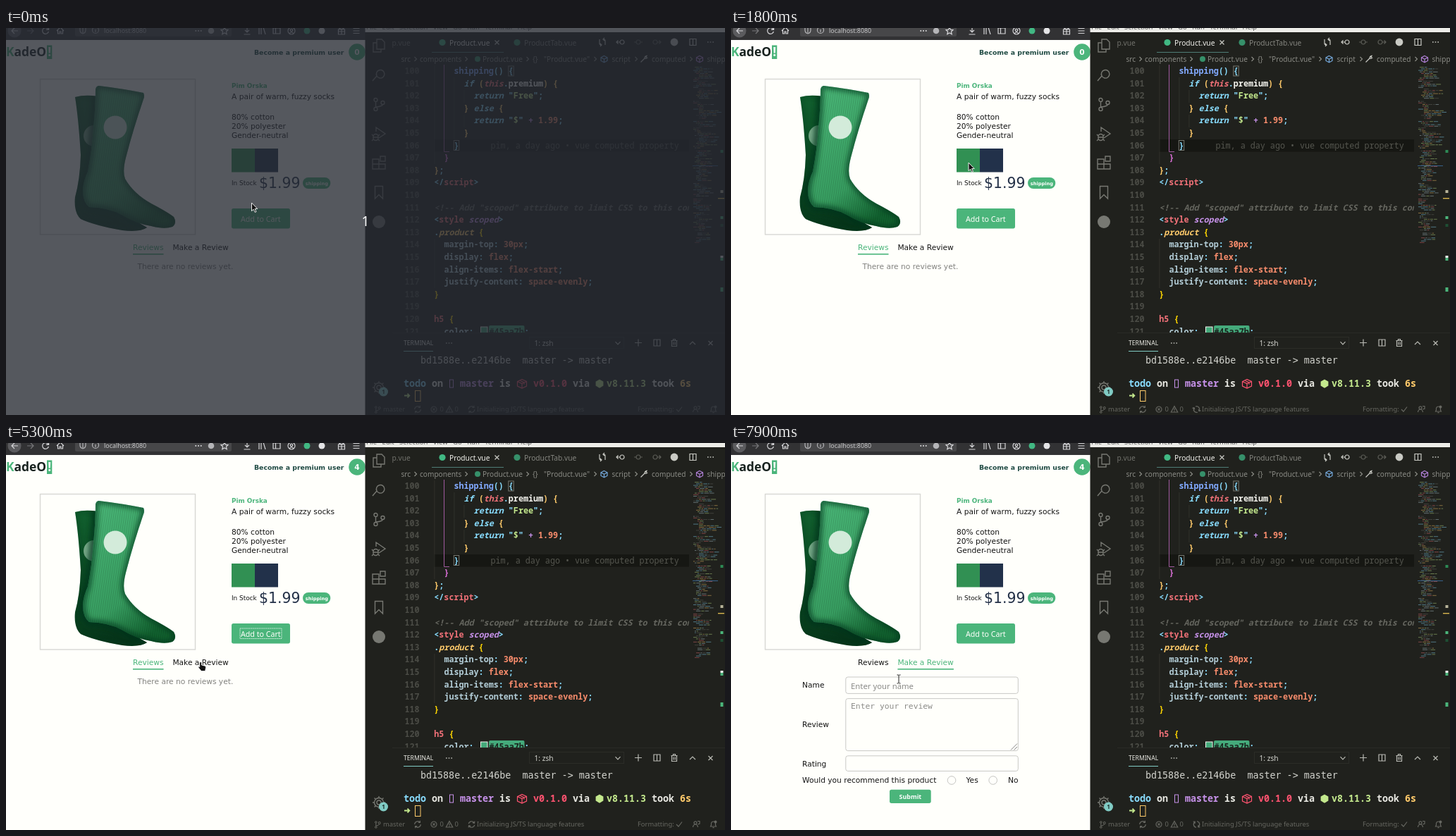
Write an HTML page that moves like this. It is 1020 by 549 pixels and loops after 8 s.

```html
<!DOCTYPE html>
<html lang="en">
<head>
<meta charset="utf-8">
<title>Shop demo</title>
<style>
html, body { margin: 0; width: 100%; height: 100%; overflow: hidden; background: #fffffb; }
svg { display: block; width: 100vw; height: 100vh; --light: #4ab778; --mid: #379d60; --deep: #11612f; --ink: #06351a; }
text { white-space: pre; font-family: "DejaVu Sans", sans-serif; }
.n { font-family: "Noto Sans", sans-serif; }
.m { font-family: "Noto Sans Mono", monospace; }
.d { font-family: "DejaVu Sans Mono", monospace; }
.b { font-weight: bold; }
.i { font-style: italic; }
.icon { fill: none; stroke-width: 1.2; }
</style>
</head>
<body>
<svg id="stage" viewBox="0 0 1020 549" xml:space="preserve"></svg>
<script>
const GREEN = '#4bb57b', DARK = '#20211d', CYAN = '#89ddff', PURPLE = '#c792ea';
const RED = '#f07178', ORANGE = '#f78c6c', LIME = '#c3e88d', GOLD = '#ffcb6b', PALE = '#b2ccd6';
const LOOP = 8000, ADV = 7.04;

const esc = s => String(s).replace(/&/g, '&amp;').replace(/</g, '&lt;');
const text = (x, y, s, fill, size, cls = '', more = '') =>
  `<text x="${x}" y="${y}" fill="${fill}" font-size="${size}" class="${cls}" ${more}>${esc(s)}</text>`;
const rect = (x, y, w, h, fill, more = '') =>
  `<rect x="${x}" y="${y}" width="${w}" height="${h}" fill="${fill}" ${more}/>`;
const dot = (x, y, r, fill, more = '') => `<circle cx="${x}" cy="${y}" r="${r}" fill="${fill}" ${more}/>`;
const icon = (x, y, d, color, more = '') =>
  `<path class="icon" transform="translate(${x} ${y})" d="${d}" stroke="${color}" ${more}/>`;
const frame = (x, y, w, h, color, r = 0) => rect(x, y, w, h, 'none', `stroke="${color}" rx="${r}"`);

const DOTS = 'M-4.5 0h1.6M-.8 0h1.6M2.9 0h1.6';
const CROSS = 'M-3 -3L3 3M3 -3L-3 3';
const SYNC = 'M-4.3 0A4.3 4.3 0 0 1 3 -3M3.4 -5.2V-2.6H.8M4.3 0A4.3 4.3 0 0 1 -3 3M-3.4 5.2V2.6H-.8';
const CUBE = 'M0 -4.5L4.5 -2.2V2.5L0 4.8L-4.5 2.5V-2.2ZM-4.5 -2.2L0 .2L4.5 -2.2M0 .2V4.8';
const SPLIT = 'M-4.5 -4.5H4.5V4.5H-4.5ZM0 -4.5V4.5';

function browserBar() {
  const c = '#d5d5d8';
  return rect(0, 0, 510, 17, '#323234') + rect(98, -4, 222, 16, '#474749', 'rx="2"') +
    dot(12, 4, 9.5, '#5b5b5e') +
    icon(12, 4, 'M5 0H-4M0 -4L-4 0L0 4', c) +
    icon(35, 4, 'M-5 0H4M0 -4L4 0L0 4', '#77777a') +
    icon(56, 4, 'M4 -2A4.4 4.4 0 1 0 4.4 1M4.6 -5V-1.6H1', c) +
    icon(77, 3, 'M-5 1L0 -4L5 1M-3.5 0V5H-1V2H1V5H3.5V0', c) +
    icon(109, 3, 'M-4 -4H4V0Q4 4 0 5Q-4 4 -4 0ZM0 -4V4', '#b5b5b8') +
    icon(127, 3, 'M-4.5 0A4.5 4.5 0 1 0 4.5 0A4.5 4.5 0 1 0 -4.5 0M0 -1V3', '#b5b5b8') +
    text(139, 7, 'localhost:8080', '#c9c9cb', 8.9, 'n') +
    icon(273, 4, DOTS, c, 'style="stroke-width:1.8"') + dot(291, 4, 4.3, '#b5b5b8') +
    icon(310, 4, 'M0 -5L1.5 -1.6L5 -1.2L2.4 1.2L3.2 4.8L0 3L-3.2 4.8L-2.4 1.2L-5 -1.2L-1.5 -1.6Z', c) +
    icon(342, 4, 'M0 -5V2M-3 -1L0 2L3 -1M-4.5 5H4.5', c) +
    icon(363, 4, 'M-4 -5V5M-1 -5V5M2 -5L5 5', c) +
    icon(384, 4, 'M-5 -4H5V4H-5ZM-1.5 -4V4', c) +
    icon(405, 4, 'M-5 0A5 5 0 1 0 5 0A5 5 0 1 0 -5 0M-1.7 -1A1.7 1.7 0 1 0 1.7 -1A1.7 1.7 0 1 0 -1.7 -1M-3 4Q0 0 3 4', c) +
    dot(427, 4, 4.5, '#41b883') + dot(448, 4, 4.5, '#e4e4e6') +
    icon(476, 4, 'M-4.5 -2H4.5V5H-4.5ZM0 -2V5M-4.5 1H4.5M0 -2Q-4 -5 -3 -2M0 -2Q4 -5 3 -2', c) +
    icon(497, 4, 'M-4.5 -3.5H4.5M-4.5 0H4.5M-4.5 3.5H4.5', c);
}

function socks() {
  const back = 'M98 98Q112 94 130 97L150 230Q170 268 200 283Q190 290 165 287Q125 280 106 271Q96 262 98 240Q105 215 106 180Q103 130 98 98Z';
  const front = 'M132 82Q165 86 195 92Q197 96 195 101Q180 145 170 184Q165 203 169 214Q181 235 206 249Q229 261 238 268Q243 277 236 282Q225 286 206 281Q186 278 164 265Q146 255 118 254Q109 247 109 230Q110 216 116 204Q122 172 124 142Q127 112 127 87Q128 82 132 82Z';
  const edge = (d, width, opacity) =>
    `<path d="${d}" fill="none" stroke="var(--ink)" stroke-width="${width}" opacity="${opacity}" filter="url(#soft)"/>`;
  return `<defs>
    <linearGradient id="front" x1=".1" y1="0" x2=".6" y2="1"><stop offset="0" stop-color="var(--light)"/>
      <stop offset=".7" stop-color="var(--mid)"/><stop offset="1" stop-color="var(--deep)"/></linearGradient>
    <linearGradient id="back" x1="0" y1="0" x2=".3" y2="1"><stop offset="0" stop-color="var(--deep)"/>
      <stop offset="1" stop-color="var(--ink)"/></linearGradient>
    <pattern id="rib" width="3" height="6" patternUnits="userSpaceOnUse" patternTransform="rotate(8)">
      <path d="M.5 0V6" stroke="#000" stroke-opacity=".12"/></pattern>
    <filter id="soft" x="-20%" y="-20%" width="140%" height="140%"><feGaussianBlur stdDeviation="3"/></filter>
    <clipPath id="backClip"><path d="${back}"/></clipPath>
    <clipPath id="frontClip"><path d="${front}"/></clipPath></defs>
    <path d="${back}" fill="url(#back)"/>
    <g clip-path="url(#backClip)">${dot(125, 153, 15, '#9cc9ad', 'opacity=".75"')}${edge(front, 12, .7)}${edge(back, 4, .5)}</g>
    <path d="${front}" fill="url(#front)"/><path d="${front}" fill="url(#rib)"/>
    <g clip-path="url(#frontClip)">${edge(front, 9, .6)}</g>
    ${dot(155, 141, 16.5, '#d3ebda')}`;
}

function shop() {
  const body = (x, y, s, fill = '#141414') => text(x, y, s, fill, 10.667);
  return rect(0, 0, 510, 549, '#fffffb') + browserBar() +
    `<text x="0" y="40" font-size="17.4" class="n b" fill="#18221f"><tspan fill="${GREEN}">K</tspan>adeO</text>` +
    rect(58, 24.5, 7.3, 19.5, GREEN) + text(59.2, 40, '!', '#fff', 17.4, 'n b') +
    text(352, 37.5, 'Become a premium user', '#1f4a43', 9.333, 'b') +
    dot(498, 34, 11.8, GREEN) + text(498, 38, 0, '#fff', 10.667, 'b', 'id="count" text-anchor="middle"') +
    rect(48.5, 72.5, 220, 220.5, '#fffffb', 'stroke="#d8d8d4" stroke-width="1.4"') + socks() +
    text(320, 84.5, 'Pim Orska', GREEN, 8.85, 'b') +
    body(320, 100.8, 'A pair of warm, fuzzy socks') + body(320, 130.3, '80% cotton') +
    body(320, 142.9, '20% polyester') + body(320, 155.5, 'Gender-neutral') +
    rect(320, 171, 33, 33.5, '#319053') + rect(353, 171, 33, 33.5, '#22314a') +
    `<g id="inStock">${text(320, 223, 'In Stock', '#141414', 8.89)}${text(359, 227.3, '$1.99', '#243148', 20.4)}
      ${rect(421, 212, 39.3, 16, GREEN, 'rx="8"')}${text(424.7, 222.5, 'shipping', '#fff', 6.67, 'b')}</g>` +
    `<g id="outStock">${text(320, 216.5, 'Out of Stock', '#141414', 8.89)}</g>` +
    `<g id="buy">${rect(320, 256, 83, 28.5, GREEN, 'rx="2.7" id="buyBox"')}
      ${text(333, 274.5, 'Add to Cart', '#fffffb', 10.667, 'n')}
      <g id="focus">${rect(332, 263, 59, 14.5, 'none', 'stroke="#fff" stroke-width=".8" stroke-dasharray="1 .6"')}</g></g>` +
    text(180, 314.6, 'Reviews', GREEN, 10.667, '', 'id="tabList"') +
    rect(180, 320, 43.5, 1.6, GREEN, 'id="lineList"') +
    text(236.4, 314.6, 'Make a Review', '#141414', 10.667, '', 'id="tabMake"') +
    rect(236.4, 320, 79.5, 1.6, GREEN, 'id="lineMake"') +
    `<g id="empty">${body(186.5, 342, 'There are no reviews yet.', '#82827f')}</g>` +
    `<g id="form">${body(101, 347.3, 'Name')}${frame(162.8, 332, 244.5, 23.4, '#c9c9c6', 3)}
      ${text(170, 348.6, 'Enter your name', '#8b8b88', 11.33, 'n')}
      ${body(101, 403, 'Review')}${frame(162.8, 362.6, 244.5, 74, '#c9c9c6', 3)}
      ${text(170, 377.3, 'Enter your review', '#8b8b88', 11.33, 'd')}
      ${icon(406, 435.5, 'M-9 0L0 -9M-4.5 0L0 -4.5', '#777', 'style="stroke-width:.9"')}
      ${body(101, 458.5, 'Rating')}${frame(162.8, 443.8, 244.5, 21.6, '#c9c9c6', 3)}
      ${body(101, 482.3, 'Would you recommend this product')}
      ${dot(313, 478.5, 5.8, '#fffffb', 'stroke="#c4c4c1"')}${body(333.5, 482.3, 'Yes')}
      ${dot(371.7, 478.5, 5.8, '#fffffb', 'stroke="#c4c4c1"')}${body(393, 482.3, 'No')}
      ${rect(225, 491.7, 58.7, 19.3, GREEN, 'rx="2.7"')}${text(238.6, 504.7, 'Submit', '#fff', 8.89, 'n b')}</g>`;
}

// Each row: indent, then colour and text pairs; a leading ~ marks italics.
const rows = [
  [4, '#82aaff', 'shipping', CYAN, '() {'],
  [6, CYAN, '~if', GOLD, ' (', RED, '~this', CYAN, '.', '#f4f4ee', 'premium', GOLD, ') {'],
  [8, CYAN, '~return', CYAN, ' "', LIME, 'Free', CYAN, '";'],
  [6, GOLD, '}', CYAN, '~ else', GOLD, ' {'],
  [8, CYAN, '~return', CYAN, ' "', LIME, '$', CYAN, '" ', PURPLE, '+', ORANGE, ' 1.99', CYAN, ';'],
  [6, GOLD, '}'], [4, CYAN, '}'], [2, '#da70d6', '}'], [0, GOLD, '}', CYAN, ';'],
  [0, CYAN, '</', RED, 'script', CYAN, '>'], [0],
  [0, '#65665f', '~<!-- Add "scoped" attribute to limit CSS to this component -->'],
  [0, CYAN, '<', RED, 'style', PURPLE, '~ scoped', CYAN, '>'],
  [0, CYAN, '.', GOLD, '~product', '#ffd700', ' {'],
  ...[['margin-top', '30px'], ['display', 'flex'], ['align-items', 'flex-start'], ['justify-content', 'space-evenly']]
    .map(([k, v]) => [2, PALE, k, CYAN, ': ', ORANGE, v, CYAN, ';']),
  [0, '#ffd700', '}'], [0], [0, RED, 'h5', '#ffd700', ' {'], [2, PALE, 'color', CYAN, ':']
];

function code() {
  let out = rect(607, 158, 362, 17.6, '#161713');
  for (const [x, y, h] of [[607.5, 53, 140], [635.5, 70, 88], [649.5, 88, 18], [649.5, 123, 18], [607.5, 299, 70]])
    out += rect(x, y, .8, h, '#34352f');
  out += `<path d="M621.5 52V175.5H629" class="icon" stroke="#a05a9f" style="stroke-width:1"/>` +
    frame(712.8, 54, 7.4, 14, '#777870') + frame(635.3, 159.5, 7.4, 14, '#777870');
  rows.forEach(([indent, ...parts], i) => {
    const y = 65 + 17.6 * i;
    out += text(565.5, y, 100 + i, '#4b4c46', 11.73, 'm b');
    let spans = '';
    for (let k = 0; k < parts.length; k += 2) {
      const slant = parts[k + 1][0] === '~';
      spans += `<tspan fill="${parts[k]}" class="${slant ? 'i' : ''}">${esc(parts[k + 1].slice(+slant))}</tspan>`;
    }
    out += `<text x="${607.3 + indent * ADV}" y="${y}" font-size="11.73" class="m b">${spans}</text>`;
  });
  const end = 65 + 17.6 * 21;
  out += text(687.5, 170.6, 'pim, a day ago • vue computed property', '#55564f', 11.73, 'm') +
    rect(673.5, 424, 9.5, 10, '#45aa7b', 'stroke="#f4f4ee"') + rect(685, 422, 50.5, 14, '#45aa7b', 'rx="2"') +
    text(685.5, end, '#45aa7b', '#18231d', 11.73, 'm b') + text(735, end, ';', CYAN, 11.73, 'm b');
  return `<clipPath id="codeClip"><rect x="555" y="52" width="414" height="380"/></clipPath><g clip-path="url(#codeClip)">${out}</g>`;
}

function minimap() {
  let seed = 7, out = '';
  const rnd = () => (seed = seed * 16807 % 2147483647) / 2147483647;
  const tints = [PALE, RED, GOLD, LIME, CYAN, '#65665f'];
  for (let y = 53; y < 304; y += 2.2) {
    if (rnd() < .12) continue;
    let x = 975 + Math.floor(rnd() * 5) * 2;
    const stop = x + 5 + rnd() * (y < 190 ? 24 : 15);
    while (x < stop) {
      const w = 1.5 + rnd() * 6;
      out += rect(x.toFixed(1), y.toFixed(1), w.toFixed(1), 1, tints[Math.floor(rnd() * 6)], 'opacity=".45"');
      x += w + 1;
    }
  }
  out += rect(974, 195, 36, 1, '#37618a') + rect(1010, 241, 9, 1.4, '#d9b64f');
  for (const [y, h, c] of [[173, 4, '#2c8a55'], [230, 4, '#b8b49a'], [267, 4, GREEN], [278, 4, '#1e4f34'], [323, 3, '#eee'], [326, 4, GREEN], [368, 6, GREEN]])
    out += rect(1013.5, y, 4, h, c);
  return out;
}

function sidebar() {
  const c = '#777872';
  const big = (y, d) => icon(529, y, d, c, 'style="stroke-width:1.4"');
  return big(25, 'M-3 -9H4L8 -5V5H-3ZM-3 -4H-8V9H3V5') +
    big(66, 'M-3 2A5.8 5.8 0 1 1 1 5A5.8 5.8 0 0 1 -3 2L-9 9') +
    big(108, 'M-7 -6A2.5 2.5 0 1 0 -2 -6A2.5 2.5 0 1 0 -7 -6M-7 7A2.5 2.5 0 1 0 -2 7A2.5 2.5 0 1 0 -7 7M3 -2A2.5 2.5 0 1 0 8 -2A2.5 2.5 0 1 0 3 -2M-4.5 -3.5V4.5M5.5 .5Q5 3 -4 4') +
    big(150, 'M-4 -3V-9L9 0L0 6M-8 4A3.5 3.5 0 0 1 -1 4V6A3.5 3.5 0 0 1 -8 6ZM-10 1L-8 3M1 1L-1 3M-10 10L-8 8M1 10L-1 8M-8 5H-1') +
    big(191, 'M-9 -5H0V9H-9ZM-9 2H9V9H0M2 -9H9V-2H2Z') +
    big(233, 'M-5.5 -8.5H5.5V9L0 3.5L-5.5 9Z') + dot(529, 275, 9, c) +
    big(510, 'M-3 0A3 3 0 1 0 3 0A3 3 0 1 0 -3 0M-6.5 0A6.5 6.5 0 1 0 6.5 0A6.5 6.5 0 1 0 -6.5 0M0 -9V-6.5M0 9V6.5M-9 0H-6.5M9 0H6.5M-6.4 -6.4L-4.6 -4.6M6.4 -6.4L4.6 -4.6M-6.4 6.4L-4.6 4.6') +
    dot(535.5, 516, 6.5, '#80cbc4') + text(533.2, 519.2, 1, '#1b2b28', 8, 'n b');
}

function header() {
  const c = '#c9cac4', grey = '#8a8b85', low = '#5c5d57';
  const crumb = (x, s) => text(x, 47.6, s, grey, 10.1, 'n');
  return rect(509.5, 0, 510.5, 6, '#ecece8') +
    text(511, 1.5, 'File   Edit   Selection   View   Go   Run   Terminal   Help', '#555', 9.5, 'n') +
    text(547.5, 24.5, 'p.vue', '#70716b', 10.2, 'n') + dot(619, 20.5, 4.6, '#41b883') +
    text(629, 24.5, 'Product.vue', '#f1f1ec', 10.2, 'n') + icon(696.5, 20.5, CROSS, c) +
    rect(604, 34, 102, 1, '#4f7d76') +
    dot(725, 20.5, 4.6, '#36906a') + text(735, 24.5, 'ProductTab.vue', '#84857f', 10.2, 'n') +
    icon(846, 20, 'M-4 -4V2Q-4 4 -1 4M-3 2L-1 4L-3 6M4 4V-2Q4 -4 1 -4M3 -6L1 -4L3 -2', c) +
    icon(872, 20, 'M-1 0A3 3 0 1 0 5 0A3 3 0 1 0 -1 0M-1 0H-6M-3.5 -2.5L-6 0L-3.5 2.5', c) +
    icon(897, 20, 'M-3 0A3 3 0 1 0 3 0A3 3 0 1 0 -3 0M-6 0H-3M3 0H6', low) +
    icon(923, 20, 'M-5 0A3 3 0 1 0 1 0A3 3 0 1 0 -5 0M1 0H6M3.5 -2.5L6 0L3.5 2.5', low) +
    dot(948, 20, 5.4, c) + icon(974.5, 20, SPLIT, c) + icon(999.5, 20, DOTS, c, 'style="stroke-width:1.6"') +
    crumb(560.5, 'src') + crumb(587, 'components') + dot(669, 44, 4, '#36906a') + crumb(676, 'Product.vue') +
    crumb(747, '{}') + crumb(763, '"Product.vue"') + icon(848.5, 44, CUBE, '#75a9dc') + crumb(859.5, 'script') +
    icon(905, 44, 'M-4.5 4.5L1 -1M1 -1A3.2 3.2 0 0 1 4 -4.6L2.8 -2.6L4.6 -1.6A3.2 3.2 0 0 1 1 -1', c) +
    crumb(916, 'computed') + icon(984, 44, CUBE, '#b180d7') + crumb(994.5, 'shipping') +
    [581, 653, 740, 836, 894, 972].map(x => icon(x, 44, 'M-1.5 -3L1.5 0L-1.5 3', grey)).join('');
}

function terminal() {
  const c = '#b9bab4', low = '#666761';
  const bold = (x, s, fill) => text(x, 508.6, s, fill, 13.33, 'm b');
  const status = (x, s) => text(x, 544.3, s, low, 9.4, 'n');
  return rect(548, 432, 472, 102, DARK) + rect(548, 432, 472, .8, '#2d2e29') +
    text(564, 450, 'TERMINAL', '#e8e8e2', 8.6, 'n') + rect(564, 458, 42, 1, '#80cbc4') +
    icon(628.5, 447, DOTS, c, 'style="stroke-width:1.6"') + frame(742.5, 438.5, 134, 16, '#2b2c27') +
    text(749.5, 450.7, '1: zsh', '#d4d5cf', 10.2, 'n') + icon(868, 447, 'M-3.5 -1.8L0 1.8L3.5 -1.8', c) +
    icon(897, 446.5, 'M-5 0H5M0 -5V5', c) + icon(923.5, 446.5, SPLIT, c) +
    icon(948, 446.5, 'M-4.5 -3H4.5M-3.5 -3V5H3.5V-3M-1.5 -3V-5H1.5V-3M-1.2 -1V3M1.2 -1V3', c) +
    icon(974, 447, 'M-4 2L0 -2L4 2', c) + icon(999.5, 447, CROSS, c) +
    text(588, 475.5, 'bd1588e..e2146be  master -> master', '#d2d3cd', 13.33, 'd') +
    bold(564, 'todo', CYAN) + bold(604, 'on', '#e8e8e2') + frame(629.5, 499, 5, 11, PURPLE) +
    bold(644, 'master', PURPLE) + bold(700, 'is', '#e8e8e2') +
    icon(732, 504.5, 'M-6.5 -3L0 -6L6.5 -3V3.5L0 6.5L-6.5 3.5ZM-6.5 -3L0 0L6.5 -3M0 0V6.5M-3.5 -4.5L3 -1.5V1', '#ff5370') +
    bold(748, 'v0.1.0', '#ff5370') + bold(804, 'via', '#e8e8e2') +
    `<path d="M842 498.5L847.4 501.6V507.6L842 510.7L836.6 507.6V501.6Z" fill="${LIME}"/>` +
    bold(852, 'v8.11.3', LIME) + bold(916, 'took', '#e8e8e2') + bold(956, '6s', GOLD) +
    icon(569, 521.5, 'M-4 0H3M.5 -2.8L3.3 0L.5 2.8', LIME, 'style="stroke-width:1.8"') +
    frame(580.5, 514.5, 7.5, 15, GOLD) +
    icon(527, 541, 'M-3.5 -3A1.3 1.3 0 1 0 -.9 -3A1.3 1.3 0 1 0 -3.5 -3M-3.5 4A1.3 1.3 0 1 0 -.9 4A1.3 1.3 0 1 0 -3.5 4M1.5 -2A1.3 1.3 0 1 0 4 -2A1.3 1.3 0 1 0 1.5 -2M-2.2 -1.7V2.7M2.8 -.7Q2 2 -2 2', low, 'style="stroke-width:1"') +
    status(535, 'master') + icon(584, 541, SYNC, low) +
    icon(607, 541, 'M-4 0A4 4 0 1 0 4 0A4 4 0 1 0 -4 0M-1.6 -1.6L1.6 1.6M1.6 -1.6L-1.6 1.6', low) + status(615.5, '0') +
    icon(629, 541, 'M0 -4.5L4.7 4H-4.7ZM0 -1.5V1.5M0 2.2V3.2', low) + status(636.5, '0') +
    `<g id="spin">${icon(0, 0, SYNC, low)}</g>` + status(668, 'Initializing JS/TS language features') +
    status(896, 'Formatting:') + icon(955, 541, 'M-4 0L-1 3L4 -3.5', low) +
    icon(979, 541, 'M-4.5 4Q-4 0 -1 0Q2 0 2.5 4M-3 -2.2A2 2 0 1 0 1 -2.2A2 2 0 1 0 -3 -2.2M2 -4.5H5V-1L2.5 0', low) +
    icon(1003.5, 541, 'M-4 3H4L3 1V-1.5Q2.5 -4 0 -4Q-2.5 -4 -3 -1.5V1ZM-1 4.6H1', low) + dot(1006.5, 537.5, 2, low);
}

const pointers = `
  <path id="arrow" d="M0 0V11.6L2.7 9.2L4.7 13.4L6.5 12.6L4.6 8.5H8.2Z" fill="#111" stroke="#fff" stroke-width=".9"/>
  <path id="hand" transform="translate(-3 0)" d="M3 .4Q4.6 .4 4.6 2.2V5L9.4 6.2Q10.8 6.7 10.5 8.8L9.6 13.5H4L.2 8.8Q-.6 7.6 .4 7.1Q1.2 6.9 1.7 7.6V2.2Q1.7 .4 3 .4Z" fill="#111" stroke="#fff" stroke-width=".8"/>
  <path id="beam" d="M-2.5 -6H-.7L0 -5.3L.7 -6H2.5M0 -5.3V5.3M-2.5 6H-.7L0 5.3L.7 6H2.5" fill="none" stroke="#222" stroke-width="1"/>`;

const stage = document.getElementById('stage');
stage.innerHTML = shop() + rect(509.5, 0, 510.5, 549, DARK) + header() + sidebar() + code() + minimap() + terminal() +
  `<g id="veil">${rect(0, 0, 1020, 549, '#262a33', 'opacity=".78"')}
    ${text(510, 281, 1, '#fff', 19, 'n', 'text-anchor="middle"')}</g><g id="pointer">${pointers}</g>`;

const el = {};
for (const node of stage.querySelectorAll('[id]')) el[node.id] = node;
const show = (node, on) => node.setAttribute('display', on ? 'inline' : 'none');
const set = (node, name, value) => node.setAttribute(name, value);

// time, x, y
const path = [
  [0, 348.5, 248], [700, 348, 248], [1100, 354, 212], [1300, 356, 187], [1500, 361, 186], [1800, 337, 191],
  [1900, 336, 191.5], [2900, 336, 191.5], [3400, 345, 273], [3600, 343.5, 276], [4600, 343.5, 276],
  [5200, 280, 311], [5500, 268, 308], [5900, 268, 309], [6100, 240, 344], [6600, 176, 385],
  [7000, 174, 374], [7400, 174, 352], [7900, 238, 335], [8000, 238, 335]
];
function pointerAt(t) {
  const i = path.findIndex(p => p[0] > t);
  const [t0, x0, y0] = path[i - 1], [t1, x1, y1] = path[i];
  const k = (t - t0) / (t1 - t0);
  return [x0 + (x1 - x0) * k, y0 + (y1 - y0) * k];
}
const within = (x, y, l, t, r, b) => x >= l && x <= r && y >= t && y <= b;

function draw(ms) {
  let t = Math.floor(ms % LOOP / 100) * 100;
  if (t < 200) t = 0;
  show(el.veil, t < 200);

  const [x, y] = pointerAt(t);
  const hand = within(x, y, 320, 256, 403, 285) || within(x, y, 236, 303, 316, 321);
  const beam = t > 5900 && within(x, y, 162, 330, 408, 466);
  set(el.pointer, 'transform', `translate(${x} ${y})`);
  show(el.hand, hand);
  show(el.beam, beam);
  show(el.arrow, !hand && !beam);

  const navy = t >= 1400 && t < 1800, sold = t >= 1300 && t < 1800;
  const shades = navy ? ['#3b4f70', '#2b3c59', '#1b2941', '#0c1626'] : ['#4ab778', '#379d60', '#11612f', '#06351a'];
  ['--light', '--mid', '--deep', '--ink'].forEach((name, i) => stage.style.setProperty(name, shades[i]));
  show(el.inStock, !sold);
  show(el.outStock, sold);
  set(el.buy, 'transform', `translate(0 ${sold ? -13.4 : 0})`);
  set(el.buyBox, 'fill', sold ? '#d1d1cf' : GREEN);

  el.count.textContent = [3600, 3900, 4200, 4500].filter(c => t >= c).length;
  show(el.focus, t >= 3600 && t < 5700);

  const open = t >= 5700;
  const k = Math.min(1, Math.max(0, (t - 5700) / 300)), p = 1 - (1 - k) ** 2;
  const mix = [[20, 75], [20, 181], [20, 123]].map(([a, b]) => Math.round(a + (b - a) * Math.sqrt(p)));
  set(el.tabList, 'fill', open ? '#141414' : GREEN);
  set(el.tabMake, 'fill', `rgb(${mix})`);
  show(el.lineList, !open);
  set(el.lineMake, 'height', 1.6 * p);
  show(el.empty, !open);
  show(el.form, open);
  set(el.form, 'transform', `translate(0 ${-4 * (1 - p)})`);

  const turn = t > 2300 && t < 2600 ? 2300 : t;
  set(el.spin, 'transform', `translate(660.5 541) rotate(${turn * .24})`);
}

const start = performance.now();
function tick() {
  draw(performance.now() - start);
  requestAnimationFrame(tick);
}
tick();
</script>
</body>
</html>
```
